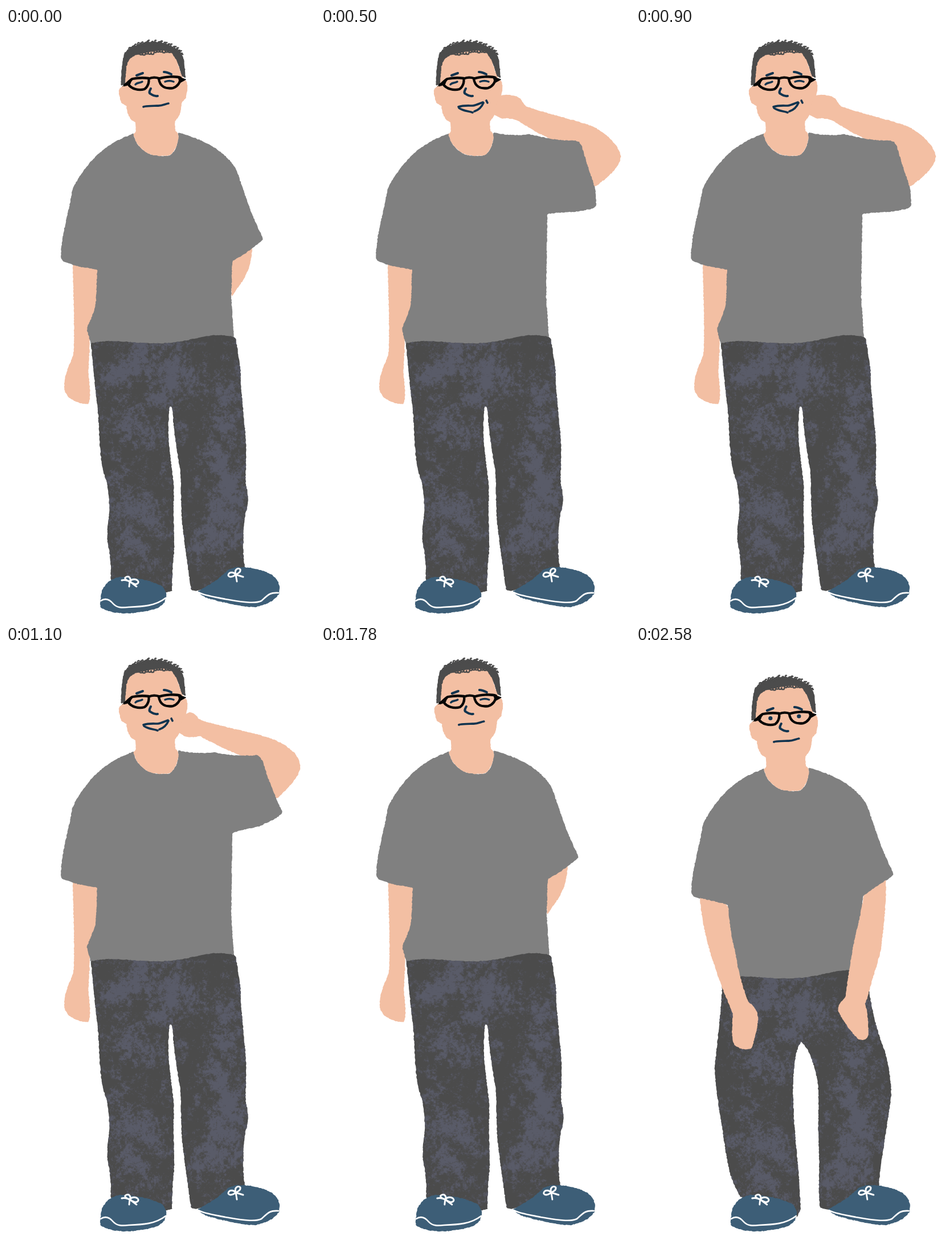
Recreate the animation shown at these times as an HTML page with a canvas. Size 542 by 1033 pixels, loop 2900 ms.

```html
<!DOCTYPE html>
<html lang="en">
<head>
<meta charset="utf-8">
<title>Man scratching his neck</title>
<style>
  html, body { margin: 0; width: 100%; height: 100%; overflow: hidden; background: #fff; }
  canvas { display: block; width: 542px; height: 1033px; }
</style>
</head>
<body>
<canvas id="stage" width="542" height="1033"></canvas>
<script>
const W = 542, H = 1033, LOOP = 2900;
const ctx = document.getElementById('stage').getContext('2d');
const SKIN = '#f3bfa3', SHIRT = '#808080', HAIR = '#4c4c4c', DENIM = '#4b4b4b',
      SHOE = '#3d5e77', NAVY = '#10344f', WHITE = '#fff', BLACK = '#060606';

function rng(seed) {
  return () => {
    seed = (seed * 1664525 + 1013904223) >>> 0;
    return seed / 4294967296;
  };
}

// Outlines
const FACE = 'M211 68C215 53 223 47 238 45C255 42 272 37 288 42C300 52 304 70 308 84L314 91C321 97 318 112 315 124L308 130C308 142 306 151 300 159L296 164L297 180L302 184C303 200 299 214 287 223C275 225 262 224 250 220C235 212 226 200 224 186L228 180L227 165C216 160 213 152 211 136C203 132 200 130 200 122C196 112 197 105 204 102L209 98Z';
const HAIR_SHAPE = 'M202 101C201 85 203 58 207 46C216 33 232 29 244 25C262 22 280 26 292 33C303 38 311 46 313 60L315 88L308 84C304 66 298 52 287 46L238 50L213 66L209 98Z';

const SHIRT_LEFT = 'M302 184C303 200 299 214 287 223C275 225 262 224 250 220C235 212 226 200 224 185C195 195 170 211 155 227C140 244 123 265 116 285C111 320 97 360 96 402C98 408 102 410 108 411C120 417 142 420 160 423C158 445 160 470 156 490C150 510 143 520 142 528C145 540 147 546 149 555L270 560L400 543C398 520 397 500 395 470';
const SHIRT_DOWN = SHIRT_LEFT + 'L397 408C415 398 435 385 451 370C447 358 437 340 430 322C420 295 412 270 404 248C392 226 360 198 302 183Z';
const SHIRT_UP = SHIRT_LEFT + 'L397 326C420 321 448 324 466 318C475 317 481 315 483 311L481 282C474 258 465 235 460 215C456 203 455 198 445 197C420 198 390 192 365 186C345 189 320 187 302 183Z';
const SHIRT_HIGH = SHIRT_LEFT + 'L397 328C412 321 430 319 444 316C460 308 475 303 485 292C475 268 464 245 456 220C452 208 450 195 440 191C420 193 388 192 365 186C345 189 320 187 302 183Z';

const ARM_LEFT = 'M117 405C118 470 121 540 118 572C112 590 103 602 102 630C104 646 118 656 143 659C149 655 148 630 145 612C144 590 147 570 147 540L165 480L162 410Z';
const ARM_RIGHT = 'M432 378C432 405 426 425 415 443L396 470L390 395Z';
const ARM_UP = 'M306 130C315 112 328 117 345 120C352 125 354 132 360 137C400 152 450 161 480 174C505 188 522 205 526 225C524 245 502 262 482 277L465 280L440 210C430 200 412 200 400 193C380 184 362 173 348 164C336 157 330 159 316 158L304 152L300 140Z';
const ARM_HIGH = 'M306 130C315 110 332 115 338 128C365 139 430 150 465 162C500 175 518 195 516 215C512 232 495 248 477 266L460 268L435 205C425 195 415 193 405 189C380 179 360 168 340 158C326 161 312 160 304 152L300 140Z';
const ARM_LEAN_L = 'M112 441C115 480 125 525 138 560C150 600 162 622 170 645C168 670 167 688 173 699C181 706 195 708 203 704C207 690 214 668 214 650C212 635 206 629 198 625C188 600 179 570 175 540C167 510 164 485 162 458L158 452Z';
const ARM_LEAN_R = 'M438 410C440 450 434 490 430 530C423 560 412 590 407 612L402 626C408 650 408 668 407 684C402 692 393 691 386 685C376 672 360 655 354 636C355 628 361 621 368 614C370 590 375 560 381 525C386 500 395 470 399 437Z';

const LEGS_STAND = 'M149 552C185 543 220 553 275 552C315 550 335 541 365 538C382 537 397 539 403 543C406 565 412 590 412 620C414 660 420 700 421 730C422 765 419 785 421 800C424 812 425 825 424 835C414 870 417 900 416 920L419 945L370 975L334 986L325 984C320 950 312 900 309 865C305 820 309 795 304 765C299 735 294 705 293 680C292 665 289 660 287 664C284 690 284 720 288 745C291 780 296 800 294 830C293 870 297 900 294 925C292 950 291 965 291 986L280 988L230 980L184 966C183 945 185 930 179 905C175 880 182 860 181 835C180 800 176 795 169 770C163 730 163 700 162 680C158 640 153 600 149 552Z';
const LEGS_BENT = 'M149 582C185 573 220 583 275 582C315 580 335 571 365 568C382 567 397 569 403 573L407 592C413 635 424 680 435 705C443 730 447 760 448 785C445 810 440 840 437 860C433 890 427 920 426 948L385 970L345 989L323 983C319 960 322 920 321 880C318 840 322 800 319 770C316 738 303 704 290 693C277 708 274 760 276 800C277 850 284 900 286 935L289 985L283 1000L230 985L183 964C165 935 160 905 156 875C152 855 152 840 146 815C144 790 138 765 138 735C142 700 149 640 151 600Z';

const SHOE_L = 'M166 995C168 975 185 963 200 961C225 960 262 970 273 977C282 985 283 995 278 1005C270 1018 250 1021 225 1024C200 1027 175 1022 165 1013Z';
const SHOE_R = 'M336 986C345 982 378 963 390 948C410 940 440 945 462 955C477 962 482 975 479 990C472 1003 455 1011 435 1014C410 1013 370 1003 352 998C344 994 340 990 336 986Z';
const SOLES = 'M166 1003C175 997 182 1001 188 1008C195 1016 205 1015 215 1014C240 1013 262 1012 280 998M338 988C345 993 365 996 385 1000C410 1004 435 1009 448 1003C460 992 463 988 478 989';
const LACES = 'M203 967C209 965 213 968 217 969C220 964 216 959 211 961C206 963 210 967 217 969C223 962 233 966 232 971C229 976 222 973 217 969L216 978M217 969L229 978M403 957C397 950 389 954 390 959C393 963 399 960 403 957C400 948 407 944 411 948C412 953 407 955 403 957L405 969M403 957L416 961';

const NOSE = 'M254 106C252 110 250 113 253 115C257 117 258 120 266 119';
const BROWS = 'M229 83L240 79M277 77C282 77 286 79 290 81';
const EYES_SHUT = 'M227 99C230 95 234 97 239 94M279 94C284 92 289 92 294 94';
const MOUTH = 'M241 138C247 136 255 137 265 136C273 137 279 133 285 132';
const SMILE = 'M241 138C250 135 259 136 266 136C273 135 278 132 284 130M242 140C250 146 259 145 266 148M269 146C278 143 282 138 285 131M290 127L292 131';
const FRAMES = 'M208 100C214 97 216 91 222 89C232 87 243 87 250 88C252 95 248 104 243 107C233 110 220 107 214 98M250 89C256 86 262 86 268 88M268 89C278 85 298 84 306 87C306 96 300 103 293 105C280 107 270 103 268 89';
const HINGES = ['M204 102C211 99 215 91 224 87L217 100Z', 'M301 84L316 90L304 97Z'];

// Resamples an outline with a slightly ragged, hand-cut edge.
const cache = new Map();
function ragged(d) {
  if (cache.has(d)) return cache.get(d);
  const el = document.createElementNS('http://www.w3.org/2000/svg', 'path');
  el.setAttribute('d', d);
  const len = el.getTotalLength(), rand = rng(d.length * 7 + 3), out = new Path2D();
  for (let s = 0; s < len; s += 2.4) {
    const p = el.getPointAtLength(s);
    out.lineTo(p.x + (rand() - .5) * 1.2, p.y + (rand() - .5) * 1.2);
  }
  out.closePath();
  cache.set(d, out);
  return out;
}

function fill(d, color) {
  ctx.fillStyle = color;
  ctx.fill(ragged(d));
}

function line(d, color, width) {
  ctx.strokeStyle = color;
  ctx.lineWidth = width;
  ctx.stroke(new Path2D(d));
}

function dot(x, y, r, color) {
  ctx.fillStyle = color;
  ctx.beginPath();
  ctx.arc(x, y, r, 0, 7);
  ctx.fill();
}

// Mottled denim: fractal noise, denser around a few worn areas.
function hash(x, y) {
  let n = Math.imul(x, 374761393) + Math.imul(y, 668265263) | 0;
  n = Math.imul(n ^ n >>> 13, 1274126177);
  return ((n ^ n >>> 16) >>> 0) / 4294967296;
}
function noise(x, y) {
  const i = Math.floor(x), j = Math.floor(y);
  let u = x - i, v = y - j;
  u *= u * (3 - 2 * u);
  v *= v * (3 - 2 * v);
  const a = hash(i, j), b = hash(i + 1, j), c = hash(i, j + 1), d = hash(i + 1, j + 1);
  return a + (b - a) * u + (c - a + (a - b - c + d) * u) * v;
}
const WORN = [
  [232, 585, 40], [300, 602, 36], [288, 645, 36], [185, 612, 26], [210, 690, 32],
  [380, 640, 22], [390, 690, 30], [372, 750, 34], [392, 795, 26], [204, 822, 34],
  [250, 850, 26], [215, 895, 34], [360, 898, 32], [385, 848, 32], [250, 725, 20]
];
function makeDenim() {
  const cv = document.createElement('canvas');
  cv.width = W;
  cv.height = H;
  const c = cv.getContext('2d'), img = c.createImageData(W, H);
  for (let y = 520; y < 1000; y++) for (let x = 130; x < 460; x++) {
    let wear = 0;
    for (const [a, b, r] of WORN) wear += Math.exp(-((x - a) ** 2 + (y - b) ** 2) / (r * r));
    let n = 0;
    for (let k = 0, s = 24; k < 5; k++, s /= 2) n += .2 * noise(x / s + k * 31, y / s + k * 17);
    const v = n + .2 * Math.min(1, wear) - .53;
    const a = Math.max(0, Math.min(1, v / .2));
    img.data.set([93, 95, 112, 200 * a], (y * W + x) * 4);
  }
  c.putImageData(img, 0, 0);
  return cv;
}
const denim = makeDenim();

function legs(d, dy) {
  fill(d, DENIM);
  ctx.save();
  ctx.clip(ragged(d));
  ctx.drawImage(denim, 0, dy);
  ctx.restore();
}

function curls() {
  const rand = rng(11);
  ctx.strokeStyle = HAIR;
  ctx.lineWidth = 2.4;
  for (let i = 0; i <= 36; i++) {
    const a = Math.PI * (1.06 + .88 * i / 36);
    const x = 259 + 50 * Math.cos(a), y = 52 + 27 * Math.sin(a);
    const h = 1 + rand() * 4, lean = (rand() - .6) * 4;
    ctx.beginPath();
    ctx.moveTo(x, y + 5);
    ctx.quadraticCurveTo(x + lean - 2, y - h, x + lean + 2, y - h + 1);
    ctx.stroke();
  }
  for (let x = 222; x < 290; x += 5) {
    ctx.beginPath();
    ctx.arc(x, (x < 262 ? 43 : 39) + rand() * 2, 2.4, 0, Math.PI);
    ctx.stroke();
  }
}

function head(pose) {
  fill(HAIR_SHAPE, HAIR);
  fill(FACE, SKIN);
  curls();
  line(BROWS, NAVY, 4);
  line(NOSE, NAVY, 4);
  line(pose.smile ? SMILE : MOUTH, NAVY, 3.6);
  if (pose.lean) {
    dot(235, 96.5, 3.6, NAVY);
    dot(285, 93, 3.6, NAVY);
  } else line(EYES_SHUT, NAVY, 3.4);
  line(FRAMES, BLACK, 4.3);
  for (const d of HINGES) fill(d, BLACK);
}

function shoes() {
  fill(SHOE_L, SHOE);
  fill(SHOE_R, SHOE);
  line(SOLES, WHITE, 2.6);
  line(LACES, WHITE, 2.9);
}

const stand = { shirt: SHIRT_DOWN, arm: ARM_RIGHT, dx: 0 };
const scratchLow = { shirt: SHIRT_UP, arm: ARM_UP, smile: true, dx: 0 };
const scratchHigh = { shirt: SHIRT_HIGH, arm: ARM_HIGH, smile: true, dx: 0 };
const rest = { ...stand, dx: .8 };
const lean = { shirt: SHIRT_DOWN, lean: true, dx: .8 };

function draw(pose) {
  ctx.setTransform(1, 0, 0, 1, 0, 0);
  ctx.fillStyle = WHITE;
  ctx.fillRect(0, 0, W, H);
  ctx.lineCap = ctx.lineJoin = 'round';
  const dy = pose.lean ? 30 : 0;
  ctx.translate(pose.dx, dy);
  if (!pose.lean) {
    fill(ARM_LEFT, SKIN);
    fill(pose.arm, SKIN);
  }
  fill(pose.shirt, SHIRT);
  head(pose);
  ctx.setTransform(1, 0, 0, 1, pose.lean ? 0 : pose.dx, 0);
  legs(pose.lean ? LEGS_BENT : LEGS_STAND, dy);
  if (pose.lean) {
    fill(ARM_LEAN_L, SKIN);
    fill(ARM_LEAN_R, SKIN);
  }
  ctx.setTransform(1, 0, 0, 1, pose.dx, 0);
  shoes();
}

function poseAt(t) {
  if (t < 500) return stand;
  if (t < 1300) return Math.floor((t - 500) / 200) % 2 ? scratchHigh : scratchLow;
  return t < 2100 ? rest : lean;
}

const start = performance.now();
let shown;
function tick() {
  const pose = poseAt((performance.now() - start) % LOOP);
  if (pose !== shown) draw(shown = pose);
  requestAnimationFrame(tick);
}
tick();
</script>
</body>
</html>
```
